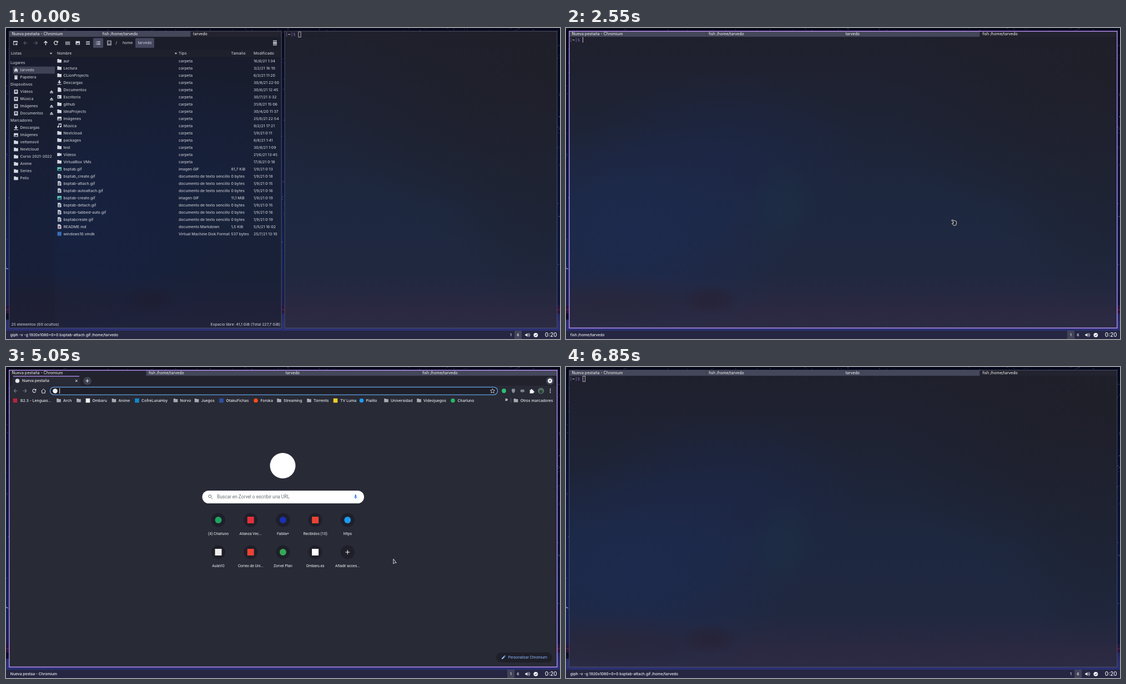
Animation, 998 px wide and 561 px high, one loop 7100 ms. Source, as an HTML page:

```html
<!DOCTYPE html>
<html lang="es">
<head>
<meta charset="utf-8">
<title>Pestañas</title>
<style>
html, body { margin: 0; width: 100%; height: 100%; overflow: hidden; background: #070b20; }
svg { display: block; width: 998px; height: 561px; }
text { font-family: Inter, sans-serif; font-size: 6.85px; font-weight: 500; fill: #bfc1ca; white-space: pre; }
.tab { font-size: 7.1px; font-weight: 400; fill: #f8f8f2; }
.bar { font-size: 6.75px; fill: #f0f0f0; }
.web { fill: #e8e8ec; }
.rob { font-family: Roboto, sans-serif; font-size: 6.76px; font-weight: 400; fill: #f0f0f2; }
.mono { font-family: "DejaVu Sans Mono", monospace; font-size: 7.7px; font-weight: 400; }
</style>
</head>
<body>
<svg id="stage" viewBox="0 0 998 561"></svg>
<script>
const USER = 'tarvedo', HOME = 'fish /home/' + USER;
const PURPLE = '#bd93f9', PALE = '#e6e6ea', DARK = '#1e1f29';
const stage = document.getElementById('stage');

function el(tag, parent, attrs = {}, str) {
  const e = document.createElementNS('http://www.w3.org/2000/svg', tag);
  for (const k in attrs) e.setAttribute(k, attrs[k]);
  if (str !== undefined) e.textContent = str;
  parent.appendChild(e);
  return e;
}
const group = (p = stage, attrs) => el('g', p, attrs);
const rect = (p, x, y, width, height, fill, more) => el('rect', p, { x, y, width, height, fill, ...more });
const dot = (p, cx, cy, r, fill) => el('circle', p, { cx, cy, r, fill });
const text = (p, x, y, str, more) => el('text', p, { x, y: y + 2.4, ...more }, str);
const line = (p, d, stroke, w = 1, more) => el('path', p, { d, stroke, 'stroke-width': w, fill: 'none', ...more });
const show = (e, on) => { e.style.display = on ? '' : 'none'; };

const gridPath = [-2.6, -.4, 1.8].map(y => [-4, -1.8, .4, 2.6].map(x => `M${x} ${y}h1.6v1.4h-1.6z`).join('')).join('');
const ICONS = {
  folder: 'M-3.8-3.3h3l1 1h3.6v5.6h-7.6z',
  down: 'M-1-4h2v3h2.5l-3.5 3.4-3.5-3.4h2.5zM-4 3h8v1.1h-8z',
  doc: 'M-3-4h4l2.3 2.3v5.7h-6.3z',
  desk: 'M-3.6-3.2h7.2v6.2h-7.2zM-2.4-.6v2h2v-2z',
  pic: 'M-3.8-3.2h7.6v6.4h-7.6zM-3 2.2h6l-2-3-1.6 2-1-1z',
  music: 'M-1.6-4h5.4v5.6a1.5 1.5 0 1 1-1-1.4v-2.4h-3.4v4a1.6 1.6 0 1 1-1-1.4z',
  video: 'M-4-2.8h5.4v1.8l2.4-1.8v5.6l-2.4-1.8v1.8h-5.4z',
  txt: 'M-3-4h4l2.3 2.3v5.7h-6.3zM-1.8-.9h3.8v.8h-3.8zM-1.8.7h3.8v.8h-3.8zM-1.8 2.3h2.6v.7h-2.6z',
  box: 'M-3.5-3.5h7v7h-7z',
  home: 'M-4 .2l4-4 4 4h-1.2v3.4h-2v-2.4h-1.6v2.4h-2v-3.4z',
  bin: 'M-3-3.8h6v1.2h-6zM-2.6-2h5.2v5.8h-5.2z',
  disk: 'M-3.4-3.8h6.8v7.6h-6.8zM0-2.4a1.9 1.9 0 1 0 .01 0zM-.6-.9h1.2v1h-1.2z',
  eject: 'M0-2.6l3 3h-6zM-3 1.2h6v1.2h-6z',
  caret: 'M-2.2-1.2h4.4l-2.2 2.8z',
  rows: 'M-3.5-3h7v1.2h-7zM-3.5-.6h7v1.2h-7zM-3.5 1.8h7v1.2h-7z',
  list: 'M-1.6-3h5.4v1.1h-5.4zM-1.6-.6h5.4v1.1h-5.4zM-1.6 1.8h5.4v1.1h-5.4zM-3.8-3h1.2v1.1h-1.2zM-3.8-.6h1.2v1.1h-1.2zM-3.8 1.8h1.2v1.1h-1.2z',
  grid: gridPath,
  window: 'M-4-3.4h8v3h-1v-1.2h-6v4h3.5v1h-4.5zM1.4.2h1.2v1.4h1.4v1.2h-1.4v1.4h-1.2v-1.4h-1.4v-1.2h1.4z',
  shield: 'M-3-3l3-1 3 1v3q-.5 3-3 4-2.5-1-3-4z',
  puzzle: 'M-3.5-2h2a1.3 1.3 0 1 1 2.5 0h2v2.2a1.3 1.3 0 1 1 0 2.4v1.4h-6.5v-2a1.3 1.3 0 0 0 0-2z',
  pencil: 'M-3 3v-1.7l4-4 1.7 1.7-4 4zM1.5-3.2l.8-.8 1.7 1.7-.8.8z',
  mic: 'M-1.3-3a1.3 1.3 0 0 1 2.6 0v3a1.3 1.3 0 0 1-2.6 0zM-2.8-.4h.9a1.9 1.9 0 0 0 3.8 0h.9a2.8 2.8 0 0 1-2.3 2.7v1.5h-1v-1.5a2.8 2.8 0 0 1-2.3-2.7z',
  speaker: 'M-4-1.3h1.8l2.2-2.2v7l-2.2-2.2h-1.8z'
};
const icon = (p, name, x, y, fill = '#d6d8df', scale = 1) =>
  el('path', p, { d: ICONS[name], transform: `translate(${x} ${y}) scale(${scale})`, fill, 'fill-rule': 'evenodd' });

let gradients = 0;
const defs = el('defs', stage);
function gradient(type, stops, attrs = {}) {
  const id = 'g' + gradients++;
  const g = el(type + 'Gradient', defs, { id, ...attrs });
  for (const [offset, color, alpha = 1] of stops)
    el('stop', g, { offset, 'stop-color': color, 'stop-opacity': alpha });
  return `url(#${id})`;
}
const vertical = stops => gradient('linear', stops, { x2: 0, y2: 1 });
const blob = (p, cx, cy, rx, ry, color, a) =>
  el('ellipse', p, { cx, cy, rx, ry, fill: gradient('radial', [[0, color, a], [.5, color, a * .6], [1, color, 0]]) });

// Wallpaper, seen only around and between windows
let seed = 11;
const rnd = () => (seed = seed * 16807 % 2147483647) / 2147483647;
const wall = group(stage, { id: 'wall' });
rect(wall, 0, 0, 998, 561, vertical([[0, '#050818'], [.35, '#0a1338'], [.75, '#12235a'], [.89, '#1b1e52'], [.95, '#2a2f70'], [1, '#2c3276']]));
rect(wall, 500, 0, 498, 500, '#060a20', { opacity: .45 });
function stars(n, x, y, w, h) {
  for (let i = 0; i < n; i++)
    rect(wall, x + rnd() * w, y + rnd() * h, .8 + rnd() * .5, .8 + rnd() * .5, '#8fa9ee', { opacity: .2 + rnd() * .6 });
}
stars(45, 0, 0, 998, 5);
stars(28, 993, 0, 5, 430);
stars(24, 496, 0, 6, 430);
stars(10, 0, 0, 5, 430);
rect(wall, 0, 501, 998, 14, '#28163c');
rect(wall, 0, 507, 998, 2, '#4c1d40');
rect(wall, 0, 515, 5.5, 11, '#0b0d24');
line(wall, 'M0 433l4 2', '#b9cbff', 1);

// Translucent window surface
el('rect', el('clipPath', defs, { id: 'pane' }), { x: 5.5, y: 5.5, width: 987.5, height: 536 });
el('rect', el('clipPath', defs, { id: 'between' }), { x: 496.5, y: 0, width: 5, height: 543 });
const glass = group(stage, { 'clip-path': 'url(#pane)' });
rect(glass, 0, 0, 998, 542, vertical([[0, '#1f202c'], [.3, '#1e2335'], [.6, '#1d2840'], [.82, '#20283f'], [.94, '#2a2941'], [1, '#2b2b43']]));
blob(glass, 120, 370, 300, 200, '#1c2b55', .65);
blob(glass, 290, 230, 260, 150, '#1c284c', .55);
blob(glass, 390, 320, 60, 80, '#1e3346', .4);
blob(glass, 990, 90, 420, 330, '#1f1f28', .85);
blob(glass, 960, 300, 160, 220, '#1e2231', .6);
blob(glass, 90, 495, 200, 50, '#2a2636', .6);
blob(glass, 260, 490, 55, 28, '#261f30', .6);
const gap = el('use', stage, { href: '#wall', 'clip-path': 'url(#between)' });

// Tab strip and frames
function tabs(p, names, right, active) {
  const w = (right - 6) / names.length;
  names.forEach((name, i) => {
    rect(p, 6 + i * w, 6, w, 9.8, i === active ? '#22232f' : '#44475a');
    text(p, 10.4 + i * w, 11, name, { class: 'tab' });
  });
}
const frame = (p, x, w, stroke, sw) =>
  rect(p, x, 5.8, w, 535.4, 'none', { stroke, 'stroke-width': sw });

// File manager
const FOLDERS = [
  ['folder', 'aur', '16/6/21 1:34'], ['folder', 'Lectura', '3/2/21 16:10'], ['folder', 'CLionProjects', '6/3/21 11:20'],
  ['down', 'Descargas', '30/8/21 22:50'], ['doc', 'Documentos', '30/6/21 12:45'], ['desk', 'Escritorio', '30/7/21 3:32'],
  ['folder', 'github', '31/8/21 15:06'], ['folder', 'IdeaProjects', '30/4/20 11:37'], ['pic', 'Imágenes', '25/8/21 22:54'],
  ['music', 'Música', '9/2/21 17:21'], ['folder', 'Nextcloud', '1/9/21 0:11'], ['folder', 'packages', '6/8/21 1:41'],
  ['folder', 'test', '30/8/21 1:09'], ['video', 'Vídeos', '21/6/21 13:45'], ['folder', 'VirtualBox VMs', '17/8/21 0:18']
].map(([i, n, d]) => [i, n, 'carpeta', '', d]);
const PLAIN = 'documento de texto sencillo', GIF = 'imagen GIF';
const FILES = FOLDERS.concat([
  ['pic', 'bsptab.gif', GIF, '81,7 KiB', '1/9/21 0:13'],
  ['txt', 'bsptab_create.gif', PLAIN, '0 bytes', '1/9/21 0:18'],
  ['txt', 'bsptab-attach.gif', PLAIN, '0 bytes', '1/9/21 0:15'],
  ['txt', 'bsptab-autoattach.gif', PLAIN, '0 bytes', '1/9/21 0:16'],
  ['pic', 'bsptab-create.gif', GIF, '11,1 MiB', '1/9/21 0:19'],
  ['txt', 'bsptab-detach.gif', PLAIN, '0 bytes', '1/9/21 0:15'],
  ['txt', 'bsptab-tabbed-auto.gif', PLAIN, '0 bytes', '1/9/21 0:16'],
  ['txt', 'bsptabcreate.gif', PLAIN, '0 bytes', '1/9/21 0:19'],
  ['txt', 'README.md', 'documento Markdown', '1,5 KiB', '5/5/21 16:02'],
  ['box', 'windows10.vmdk', 'Virtual Machine Disk Format', '537 bytes', '25/7/21 13:10']
]);
const PLACES = [
  ['', 'Lugares'], ['home', USER], ['bin', 'Papelera'],
  ['', 'Dispositivos'], ['disk', 'Vídeos'], ['disk', 'Música'], ['disk', 'Imágenes'], ['disk', 'Documentos'],
  ['', 'Marcadores'], ['down', 'Descargas'], ['pic', 'Imágenes'], ['folder', 'veltamovil'], ['folder', 'Nextcloud'],
  ['folder', 'Curso 2021-2022'], ['folder', 'Anime'], ['folder', 'Series'], ['folder', 'Pelis']
];

function fileManager(p, dx) {
  const right = 496 + dx;
  rect(p, 6, 15.8, right - 6, 37, '#1a1c28', { opacity: .75 });
  rect(p, 6, 39.5, right - 6, 13, '#22232f', { opacity: .55 });
  rect(p, 6, 52.8, right - 6, 488.2, '#0f172c', { opacity: .38 });
  rect(p, 6, 52.8, 82, 488.2, '#1a1b2a', { opacity: .25 });
  icon(p, 'window', 17, 27);
  line(p, 'M39 27h-7m3-3l-3 3 3 3M49.5 27h7m-3-3l3 3-3 3', '#555868', 1.2);
  line(p, 'M71.5 31v-7m-3 3l3-3 3 3', PALE, 1.3);
  line(p, 'M92.6 25.2a3.2 3.2 0 1 0 .2 3', PALE, 1.2);
  el('path', p, { d: 'M93.8 23v3.5h-3.5z', fill: PALE });
  rect(p, 157, 18.3, 18, 17.5, '#464960', { rx: 1.5 });
  ['grid', 'pic', 'rows', 'list'].forEach((n, i) => icon(p, n, 111 + 18.3 * i, 27));
  icon(p, 'disk', 186, 27, '#858795', 1.2);
  text(p, 197.5, 27, '/');
  text(p, 210, 27, 'home');
  rect(p, 233, 18.3, 34, 17.5, '#44475f', { rx: 1.5 });
  text(p, 250, 27, USER, { 'text-anchor': 'middle' });
  icon(p, 'rows', 484.5 + dx, 25.6);
  icon(p, 'rows', 484.5 + dx, 28.2);

  text(p, 9, 46, 'Listas');
  icon(p, 'caret', 81, 46);
  text(p, 92, 46, 'Nombre');
  icon(p, 'caret', 306 + dx, 46);
  const cols = [311, 405.5, 446].map(x => x + dx);
  ['Tipo', 'Tamaño', 'Modificado'].forEach((s, i) => text(p, cols[i], 46, s));

  rect(p, 12.5, 69.6, 75.5, 12.8, '#44475a', { opacity: .9 });
  PLACES.forEach(([ico, name], i) => {
    const y = 63 + 13 * i;
    text(p, ico ? 25.6 : 8, y, name);
    if (ico) icon(p, ico, 18, y);
    if (ico === 'disk') icon(p, 'eject', 82, y);
  });
  FILES.forEach(([ico, name, kind, size, date], i) => {
    const y = 59.2 + 13 * i;
    const tint = ico === 'box' ? '#3b6fb5' : kind === GIF ? '#5cc5b5' : undefined;
    icon(p, ico, 96.2, y, tint);
    if (name === 'README.md') rect(p, 94.5, y, 3, 2, '#c0505a');
    text(p, 103.4, y, name);
    [kind, size, date].forEach((s, k) => s && text(p, cols[k], y, s));
  });
  text(p, 9.5, 534.8, '25 elementos (60 ocultos)');
  text(p, 494.2 + dx, 534.8, 'Espacio libre: 41,1 GiB (Total 227,7 GiB)', { 'text-anchor': 'end' });
}

// Shell prompt; returns a switch between beam and hollow cursor
function prompt(p, x, y) {
  const t = text(p, x, y, '', { class: 'mono' });
  for (const s of '[~]$') {
    const tilde = s === '~';
    el('tspan', t, { style: tilde ? 'fill:#e4e4ea;font-weight:700' : 'fill:#8467b4' }, s);
  }
  const beam = rect(p, x + 23.2, y - 5, .9, 10, '#d8d8de');
  const hollow = rect(p, x + 23.6, y - 4.7, 4.3, 9.6, 'none', { stroke: '#d0d0d6', 'stroke-width': .8 });
  return on => { show(beam, on); show(hollow, !on); };
}

// Browser: icon colour (none = folder), icon x, name, name x, round
const MARKS = [
  ['#b3263a', 16.5, 'B2.3 - Lenguas...', 26], ['', 95, 'Arch', 103], ['', 131, '', 0], ['#f4f4f4', 147.5, 'Ombaru', 155.5],
  ['', 194.5, 'Anime', 202.5], ['#1189c9', 236, 'CofreLunaHoy', 244], ['', 305.5, 'Norvo', 313.5], ['', 343.5, 'Juegos', 351.5],
  ['#2e51a2', 388, 'OtakuFichas', 396.5], ['#ff4d16', 450, 'Foroka', 458.5, 1], ['', 492, 'Streaming', 500], ['', 546, 'Torrents', 554],
  ['#f2cf2b', 593.5, 'TV Luma', 602], ['#1d9bf0', 640.5, 'Pialito', 648.5, 1], ['', 685, 'Universidad', 693], ['', 744, 'Videojuegos', 752],
  ['#25b862', 805, 'Charluno', 813.5, 1], ['', 918.5, 'Otros marcadores', 926.7]
];
const SITES = [
  ['(4) Charluno', '#1fa463', 1], ['Alianza Vec...', '#e0313c'], ['Fablia+', '#1b2fb4', 1], ['Recibidos (10)', '#ea4335'], ['https', '#1d9bf0', 1],
  ['AulaVO', '#eeeeee'], ['Correo de Uni...', '#ea4335'], ['Zorvel Plan', '#34a853', 1], ['Ombaru.es', '#ffffff'], ['Añadir acces...']
];

function browser(p) {
  rect(p, 6, 15.8, 986.5, 525.2, '#282a36');
  rect(p, 6, 15.8, 986.5, 18, '#21222c');
  el('path', p, { d: 'M8 34q3.5 0 3.5-4v-10q0-3.5 3.5-3.5h115q3.5 0 3.5 3.5v10q0 4 3.5 4z', fill: '#282a36' });
  rect(p, 13, 16, 119, 1.2, PURPLE);
  dot(p, 20.5, 25, 3.8, PALE);
  text(p, 29, 25, 'Nueva pestaña', { class: 'web' });
  line(p, 'M124.8 23l4 4m0-4l-4 4', PALE);
  dot(p, 146.5, 25, 7.3, '#3d4050');
  line(p, 'M143.5 25h6m-3-3v6', PALE, 1.1);
  dot(p, 980, 25, 7.3, '#3d4050');
  dot(p, 980, 25, 4.2, '#f4f4f6');
  icon(p, 'caret', 980, 25, '#3d4050', .85);

  line(p, 'M21 43h-6.5m3-3l-3 3 3 3M30.5 43h6.5m-3-3l3 3-3 3', '#777a88', 1.1);
  line(p, 'M53.5 41.3a3 3 0 1 0 .3 2.6', PALE, 1.1);
  el('path', p, { d: 'M54.5 39.3v3.3h-3.3z', fill: PALE });
  line(p, 'M63.5 43.5l4-4 4 4m-6.8-.8v4.3h5.6v-4.3', PALE);
  rect(p, 79.5, 36.3, 806, 13.8, DARK, { rx: 6.9, stroke: '#62a0e0', 'stroke-width': 1.3 });
  dot(p, 88.5, 43.2, 4.2, '#f4f4f4');
  line(p, 'M876.5 39l1.2 2.7 2.9.3-2.2 2 .7 2.9-2.6-1.5-2.6 1.5.7-2.9-2.2-2 2.9-.3z', PALE, .8);
  dot(p, 897, 43, 3.9, '#2fbf71');
  icon(p, 'shield', 914, 43, '#8a8c98');
  rect(p, 926.5, 40.5, 7.5, 5, '#7d7f8a', { rx: 2.5 });
  icon(p, 'puzzle', 947, 43.5, '#f0f0f2');
  dot(p, 963.7, 43, 5.6, '#53705f');
  dot(p, 963.7, 44.5, 3, '#2e3f3c');
  [-3, 0, 3].forEach(d => dot(p, 980.5, 43 + d, .9, PALE));

  for (const [color, x, name, tx, round] of MARKS) {
    if (!color) icon(p, 'folder', x, 60.3, '#a9abb3');
    else rect(p, x - 3.8, 56.7, 7.6, 7.6, color, { rx: round ? 3.8 : 0 });
    if (name) text(p, tx, 60.4, name, { class: 'web' });
  }
  text(p, 898.5, 60, '»', { class: 'web', style: 'font-size:9px;font-weight:700' });
  rect(p, 909, 56, .7, 9, '#565968');

  dot(p, 498.5, 178, 23, '#ffffff');
  rect(p, 353.5, 223, 291.5, 23, '#ffffff', { rx: 11.5 });
  line(p, 'M369.7 236l2.2 2.3M369.8 233.2a2.5 2.5 0 1 0-5 0a2.5 2.5 0 1 0 5 0', '#5f6368');
  text(p, 380, 234.8, 'Buscar en Zorvel o escribir una URL', { class: 'rob', style: 'font-size:8.32px;fill:#6b6f75' });
  icon(p, 'mic', 629.8, 234.3, '#4285f4');
  SITES.forEach(([name, color, round], i) => {
    const x = 382.5 + 58.2 * (i % 5), y = i < 5 ? 276 : 334;
    dot(p, x, y, 12.5, DARK);
    if (color) rect(p, x - 6, y - 6, 12, 12, color, { rx: round ? 6 : 0 });
    else line(p, `M${x - 3.8} ${y}h7.6m-3.8-3.8v7.6`, '#ffffff');
    text(p, x, y + 24.6, name, { class: 'rob', 'text-anchor': 'middle' });
  });
  rect(p, 883, 515, 101, 18, DARK, { rx: 9 });
  icon(p, 'pencil', 896, 524, '#8ab4f8');
  text(p, 904.5, 524, 'Personalizar Chromium', { class: 'rob', style: 'fill:#8ab4f8' });
  return rect(p, 96.2, 38.2, .9, 9.8, '#ffffff');
}

// Split layout
const TITLES = ['Nueva pestaña - Chromium', HOME, USER];
const split = group();
fileManager(split, 0);
tabs(split, TITLES, 496, 2);
frame(split, 5.8, 490.4, '#53566c', .9);
const splitShell = prompt(split, 503.2, 11.6);

// Tabbed layout: one body per view
const wide = group();
const files = group(wide), web = group(wide), shell = group(wide);
fileManager(files, 496.5);
const caret = browser(web);
const wideShell = prompt(shell, 6.7, 21.3);
const strips = [0, 1, 2, 3].map(i => {
  const g = group(wide);
  tabs(g, [...TITLES, HOME], 992, i);
  return g;
});

const frames = (color, w) => [frame(split, 502, 490.8, color, w), frame(wide, 5.8, 987, color, w)];
const idleFrames = frames('#53566c', .9), liveFrames = frames(PURPLE, 1.4);

// Status bar
const bar = group();
rect(bar, 0, 546, 998, 15, '#252742');
const label = text(bar, 7.8, 553.8, '', { class: 'bar' });
const marker = rect(bar, 0, 546, 13, 15, '#414459');
text(bar, 909.5, 553.8, '1', { class: 'bar', 'text-anchor': 'middle' });
text(bar, 922.5, 553.8, '6', { class: 'bar', 'text-anchor': 'middle' });
icon(bar, 'speaker', 939.3, 553.8, '#f4f4f4');
line(bar, 'M940.5 551.8q1.8 2 0 4M941.5 550.2q4 3.6 0 7.2', '#f4f4f4', .9);
dot(bar, 954.3, 553.8, 3.9, '#f4f4f4');
line(bar, 'M952.5 553.8l1.4 1.5 2.4-2.7', '#252742');
el('text', bar, { x: 992.5, y: 557.3, class: 'bar', 'text-anchor': 'end', style: 'font-size:9.8px' }, '0:20');

// Pointers, hot spot at the origin
const pointer = (d, fill = 'none') => line(group(), d, '#e8e8ec', .95, { fill });
const pointers = {
  beam: pointer('M-2-4q2 0 2 1.2q0-1.2 2-1.2M0-3v6.500M-2 4.2q2 0 2-1.2q0 1.2 2 1.2'),
  arrow: pointer('M.5.3v8.700l2.3-1.9h3z', '#22232c'),
  hand: pointer('M-2.7.8q.4-1 1.6-.6l3.3 1.4 2.4.5q1.5.5 1.6 2l-.5 4q-.3 2-2 2h-2.7l-3-3.5.7-.8 1.8.8-.5-3.7-2.2-.9z', '#22232c')
};

const RECORD = `giph -v -g 1920x1080+0+0 bsptab-attach.gif /home/${USER}`;
const LOOP = 7100, TICK = 50;
// time, active tab (-1 = split), focused, bar label, pointer
const STEPS = [
  [0, -1, false, RECORD, ''],
  [750, -1, true, HOME, 'beam'],
  [2500, 3, true, HOME, 'hand'],
  [4300, 2, true, USER, 'arrow'],
  [4700, 1, true, HOME, 'beam'],
  [5000, 0, true, 'Nueva pestaa - Chromium', 'arrow'],
  [5700, 3, true, HOME, 'beam'],
  [6850, 3, false, RECORD, '']
];

// Distance from the resting place: slows in, speeds out
function away(t) {
  if (t < 900) return (1 - Math.floor((t - 750) / TICK) / 3) ** 2;
  if (t >= 6600) return ((Math.floor((t - 6600) / TICK) + 1) / 5) ** 2;
  return 0;
}

function render(t) {
  const [, tab, focus, title, kind] = STEPS.filter(s => s[0] <= t).pop();
  const isSplit = tab < 0, attaching = t >= 2500 && t < 2550;
  show(split, isSplit);
  show(gap, isSplit);
  show(wide, !isSplit);
  show(files, tab === 2);
  show(web, tab === 0);
  show(shell, (tab === 1 || tab === 3) && !attaching);
  strips.forEach((s, i) => show(s, i === tab));
  idleFrames.forEach(f => show(f, !focus));
  liveFrames.forEach(f => show(f, focus));
  splitShell(focus);
  wideShell(focus);
  show(caret, t < 5500);
  if (label.textContent !== title) label.textContent = title;
  marker.setAttribute('x', focus ? 903 : 916);

  const u = away(t), x = 697.4 + 30 * u, y = 346 + 203 * u;
  const shape = kind && y > 541 ? 'arrow' : kind;
  for (const k in pointers) {
    show(pointers[k], k === shape);
    pointers[k].setAttribute('transform', `translate(${x} ${y})`);
  }
}
function loop() {
  render(performance.now() % LOOP);
  requestAnimationFrame(loop);
}
loop();
</script>
</body>
</html>
```
